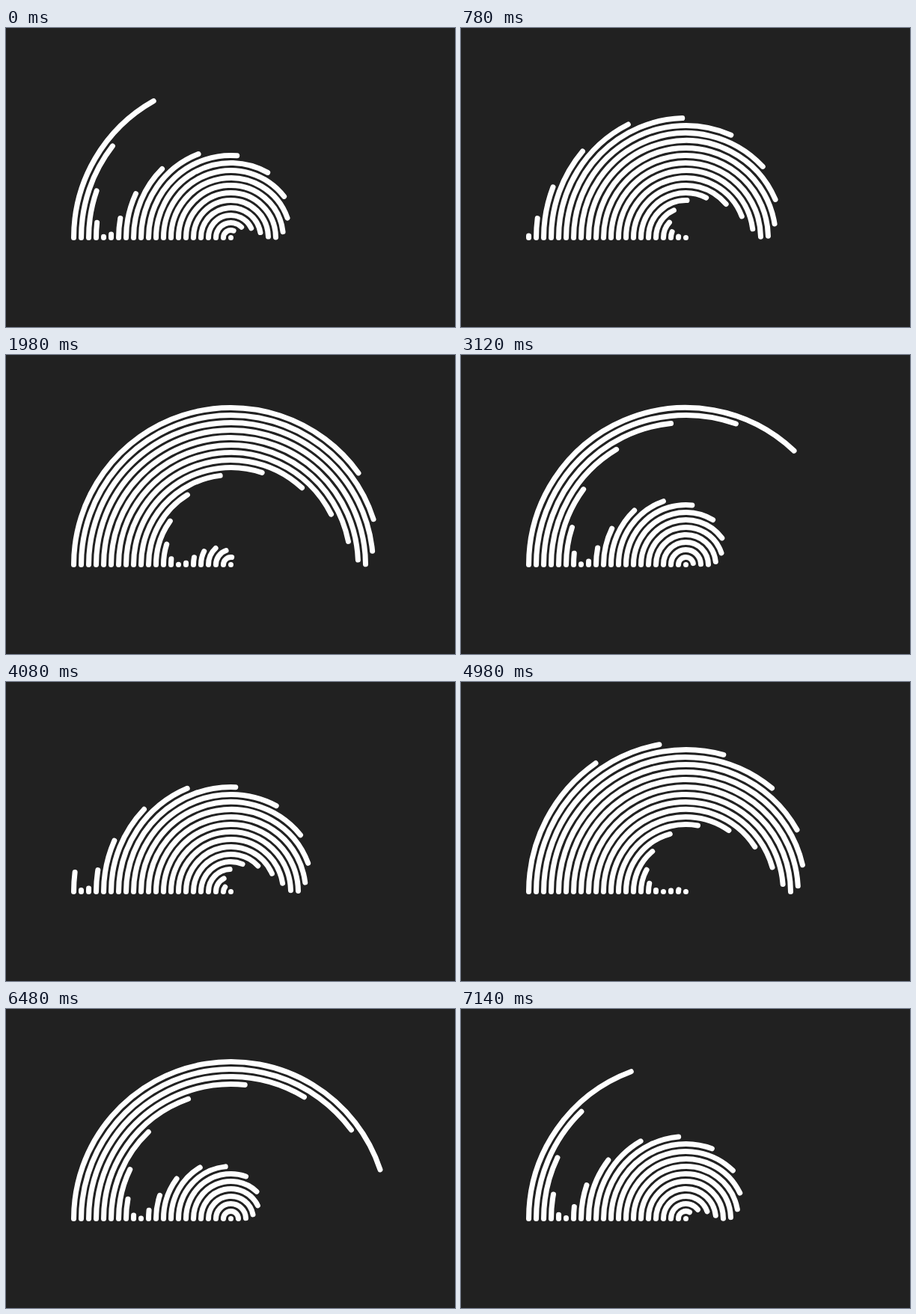
Write an HTML page that moves like this. It is 600 px wide and 400 px high and loops after 7.2 s.

```html
<!DOCTYPE html>
<html lang="en">
<head>
<meta charset="utf-8">
<title>Arc wave</title>
<style>
  html, body { margin: 0; width: 100%; height: 100%; overflow: hidden; background: #212121; }
  svg { display: block; width: 600px; height: 400px; }
  path { fill: none; stroke: #fff; stroke-width: 7; stroke-linecap: round; }
  circle { fill: #fff; }
</style>
</head>
<body>
<svg viewBox="0 0 600 400"></svg>
<script>
const CX = 300.5, CY = 280.5, GAP = 10, ARCS = 21;
const STEP_MS = 60, STEPS_PER_CYCLE = 60;
const TURN = 2 * Math.PI;
const LAG = TURN / (ARCS + 1);
const START = 70.9 / 360 * TURN;

const svg = document.querySelector('svg');

function add(tag, attributes = {}) {
  const node = document.createElementNS('http://www.w3.org/2000/svg', tag);
  for (const name in attributes) node.setAttribute(name, attributes[name]);
  return svg.appendChild(node);
}

add('circle', { cx: CX, cy: CY, r: 3.5 });
const arcs = Array.from({ length: ARCS }, (_, i) => ({
  radius: (i + 1) * GAP,
  lag: (ARCS - 1 - i) * LAG,
  node: add('path')
}));

// Each arc opens clockwise from the left, swinging between 0 and 180 degrees.
function arcPath(radius, sweep) {
  const x = CX - radius * Math.cos(sweep);
  const y = CY - radius * Math.sin(sweep);
  return `M${CX - radius} ${CY}A${radius} ${radius} 0 0 1 ${x.toFixed(3)} ${y.toFixed(3)}`;
}

function render(time) {
  // The picture advances in 60 ms steps; the margin absorbs timer rounding.
  const step = Math.floor((time + 4) / STEP_MS) % STEPS_PER_CYCLE;
  const phase = START - step / STEPS_PER_CYCLE * TURN;
  for (const { radius, lag, node } of arcs) {
    const sweep = Math.PI / 2 * (1 - Math.cos(phase - lag));
    node.setAttribute('d', arcPath(radius, Math.max(sweep, 0.0005)));
  }
}

function tick(now) {
  render(now);
  requestAnimationFrame(tick);
}

render(0);
requestAnimationFrame(tick);
</script>
</body>
</html>
```
